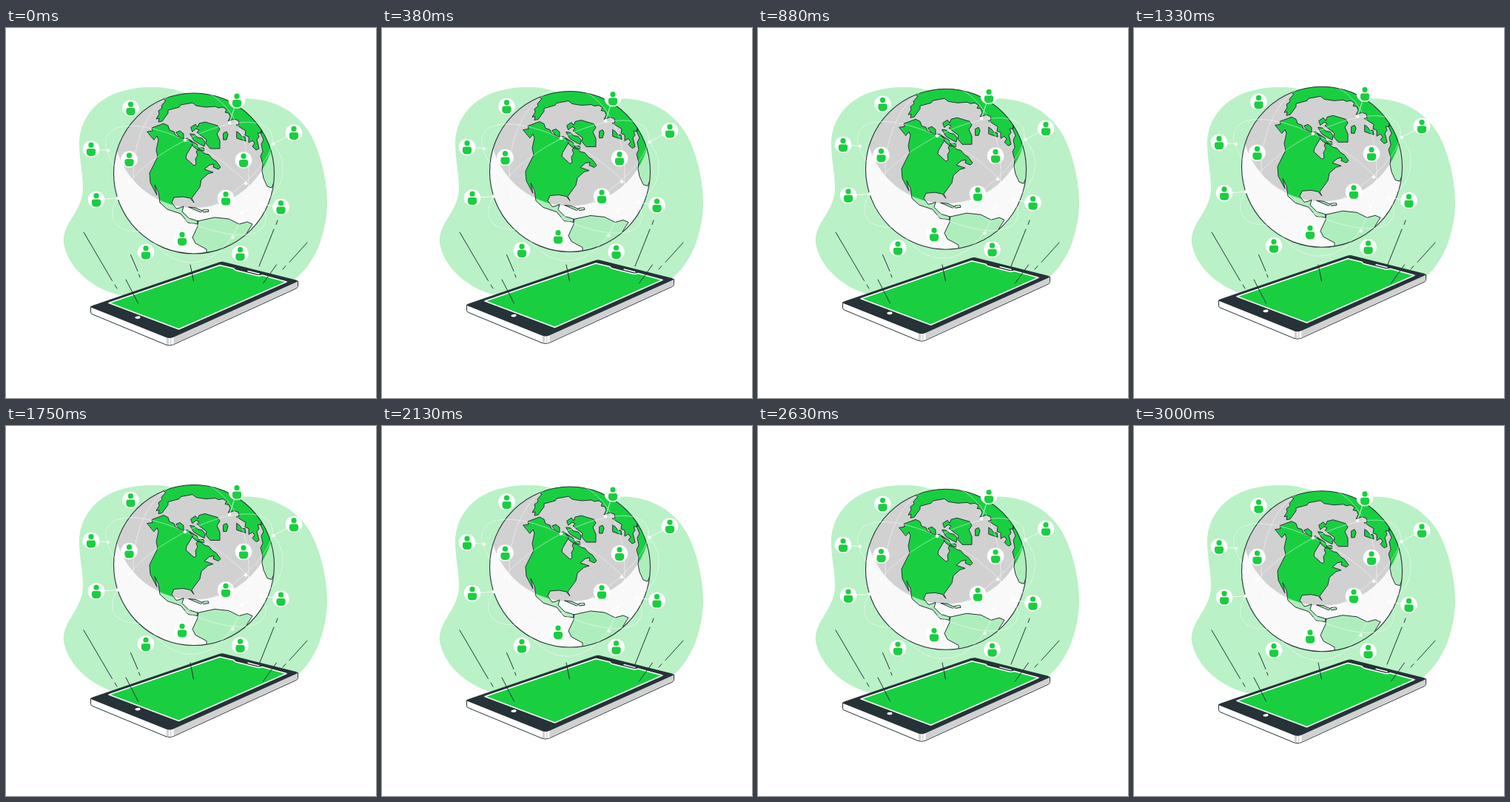
An HTML page with a canvas that plays this animation: 500x500 px, repeating every 3040 ms.

```html
<!DOCTYPE html>
<html lang="en">
<head>
<meta charset="utf-8">
<title>Connected globe</title>
<style>
html, body { margin: 0; width: 100%; height: 100%; overflow: hidden; background: #fff; }
canvas { display: block; width: 500px; height: 500px; }
</style>
</head>
<body>
<canvas id="stage" width="500" height="500"></canvas>
<script>
const ctx = document.getElementById('stage').getContext('2d');
const LOOP = 3040, LIFT = 10;
const GREEN = '#19cf40', PALE = '#baf1c6', DARK = '#263238', GREY = '#d1d1d1';

function oval(x, y, rx, ry, turn = 0) {
  const path = new Path2D();
  path.ellipse(x, y, rx, ry, turn, 0, Math.PI * 2);
  return path;
}

const disc = (x, y, r) => oval(x, y, r, r);

const globe = disc(254, 196.5, 108.5);
const shade = disc(254, 134.5, 108.5);
const land = new Path2D();
const addLand = d => land.addPath(new Path2D(`M${d}Z`));

// North and Central America
addLand(`191 140 L198 139 197 135 213 129 219 132 221 138 227 140 229 145 240 150 246 149
  253 156 244 171 243 176 254 186 257 184 256 177 259 172 257 167 260 163 269 170 274 171
  279 177 284 180 290 188 287 191 280 188 281 184 275 185 268 191 280 195 273 197 264 205
  262 215 251 230 254 236 249 230 239 228 227 229 224 236 230 244 235 243 240 241 238 248
  247 257 260 261 259 265 246 263 236 251 218 245 208 236 206 222 201 212 204 226 195 209
  194 196 205 174 203 165 206 151 204 146 200 151Z`.slice(0, -1));

// South America
addLand(`259 261 L268 259 282 256 301 258 315 265 326 262 333 265 326 276 324 284
  300 309 271 309 271 299 256 291 252 283 259 268`);

// Arctic rim and Europe
addLand(`206 93 L216 98 210 105 211 108 206 112 207 116 203 123 207 122 206 127 211 126
  219 115 219 111 234 107 236 104 252 101 257 105 270 107 283 106 287 108 293 107 298 110
  296 114 301 115 303 120 300 126 308 123 314 125 315 130 311 131 324 139 323 145 328 147
  328 155 333 152 336 156 333 160 338 165 342 163 339 151 342 147 340 142 345 142 347 136
  343 128 347 125 355 140 350 90 285 75`);

// Africa
addLand(`343 124 L346 133 344 142 348 151 345 157 347 167 344 173 347 184 346 193 348 203
  353 214 359 216 370 190 350 115`);

// Greenland, Canadian isles, British Isles, Iceland, Caribbean
addLand(`250 134 L256 130 259 134 261 129 269 127 286 132 289 137 285 143 289 152 289 163
  276 163 270 156 271 151 258 141 261 138 257 136 252 140`);
addLand('249 143 L255 144 259 148 265 149 269 154 268 160 262 157 254 152');
addLand('248 151 L258 157 260 162 267 162 268 166 259 165 253 160');
addLand('230 141 L235 139 240 143 240 150 236 149');
addLand('312 140 L316 143 319 147 323 147 324 153 312 149');
addLand('294 142 L298 140 300 144 298 151 294 151');
addLand('247 242 L256 243 265 247 264 249');
addLand('266 246 L273 245 274 248 267 249');

function fill(path, color) {
  ctx.fillStyle = color;
  ctx.fill(path);
}

function stroke(path, color, width = 1) {
  ctx.strokeStyle = color;
  ctx.lineWidth = width;
  ctx.stroke(path);
}

function shape(d, color, edge, width) {
  const path = new Path2D(d);
  if (color) fill(path, color);
  if (edge) stroke(path, edge, width);
}

function drawBlob() {
  shape(`M195 80 C222 79 240 87 262 95 C283 102 305 95 329 95.5
    C364 97 394 114 411 143 C425 168 434 205 434 237 C433 280 417 318 392 338
    C350 365 185 366 150 360 C112 350 83 321 78 291 C75 264 104 248 104 216
    C104 196 99 178 99 157 C99 129 114 106 138 93 C154 84 176 80 195 80Z`, PALE);
}

function drawGlobe() {
  fill(globe, '#f9f9f9');
  ctx.save();
  ctx.clip(globe);
  fill(land, '#aeeebc');
  ctx.save();
  ctx.clip(shade);
  fill(globe, GREY);
  fill(land, GREEN);
  ctx.restore();
  stroke(land, DARK);
  ctx.restore();
  stroke(globe, DARK, 1.1);
}

const icons = [[115, 163.5], [122, 232], [389, 141.5], [371.5, 242], [312, 97.5], [168.5, 108.5],
  [166.5, 177.5], [321, 178.5], [297, 230], [238, 284.5], [189, 303], [316.5, 305]];

// The first five nodes each link to the icon of the same index.
const nodes = [[138, 165.5], [151, 230], [361.5, 156.5], [345, 238], [302, 128],
  [242, 151.5], [324, 210], [166, 209], [319, 250], [306.5, 283]];

function drawNetwork() {
  const tint = 'rgba(255,255,255,0.55)';
  stroke(oval(243, 206, 122, 48, Math.PI / 6), tint, 0.9);
  stroke(oval(252, 201, 122, 48, -Math.PI / 6), tint, 0.9);
  stroke(oval(250, 200, 78, 117), tint, 0.9);
  shape('M361 157 C371 168 375 180 374 193 C372 225 349 237 319 249', null, tint, 0.9);
  nodes.forEach(([x, y], i) => {
    if (i < 5) shape(`M${x} ${y}L${icons[i]}`, null, 'rgba(255,255,255,0.8)', 1);
    fill(disc(x, y, 2.2), '#fff');
  });
}

function drawIcon([x, y]) {
  fill(disc(x, y, 11.3), '#fff');
  fill(disc(x, y - 5.3, 3.6), GREEN);
  const body = new Path2D();
  body.roundRect(x - 6.1, y - 0.5, 12.2, 10, [3, 3, 4.5, 4.5]);
  fill(body, GREEN);
}

function drawPhone() {
  shape(`M114.5 377 V384 Q114.5 386 117 387 L216 428 Q221 430 226 428
    L392 352 Q394.5 351 394.5 348 V342 L222 414Z`, '#fff', DARK);
  shape('M222 418 L394 342 V348 Q394 350 392 351 L226 427.5 222 428.5Z', GREY);
  shape('M217 418 H220 V428.5 L217 427.5Z', GREY);
  shape('M223.5 418 L226.5 417 V427 L223.5 428Z', '#fff');
  shape(`M117 375 L288 316.5 Q291 315.5 294 316 L392 340.5 Q396 342 392 343.5
    L226 418 Q221 420 216 418 L116 378 Q113 376.5 117 375Z`, DARK);
  shape(`M139 371.5 L289 320.5 308 325 Q309 327.5 313 328 L339 334.5
    Q342 335.5 346 334 L379 343 233.5 407Z`, GREEN, '#fff', 1.6);
  shape('M327 328.5 L342 332.3', null, '#fff', 1.4);
  fill(oval(178, 391.2, 3.6, 1.8, -0.1), '#fff');
}

function drawRays() {
  shape(`M105 276 L143.5 341.5 M147 347 L150 352 M162 340 L178.5 372
    M168.5 306.5 L178 328.5 M179.5 333 L181 337 M249 320 L253.5 342
    M365.5 320 L347.5 345 M362 272 L342 322 M367 260 L365 265.5
    M407 290 L383 316.5 M378 321.5 L374 326`, null, DARK);
}

function draw(t) {
  const lift = LIFT * (1 - Math.abs(1 - 2 * t / LOOP));
  ctx.fillStyle = '#fff';
  ctx.fillRect(0, 0, 500, 500);
  drawBlob();
  ctx.save();
  ctx.translate(0, -lift);
  drawGlobe();
  drawNetwork();
  icons.forEach(drawIcon);
  drawPhone();
  ctx.restore();
  drawRays();
}

ctx.lineJoin = ctx.lineCap = 'round';
const start = performance.now();
function tick() {
  draw((performance.now() - start) % LOOP);
  requestAnimationFrame(tick);
}
tick();
</script>
</body>
</html>
```
